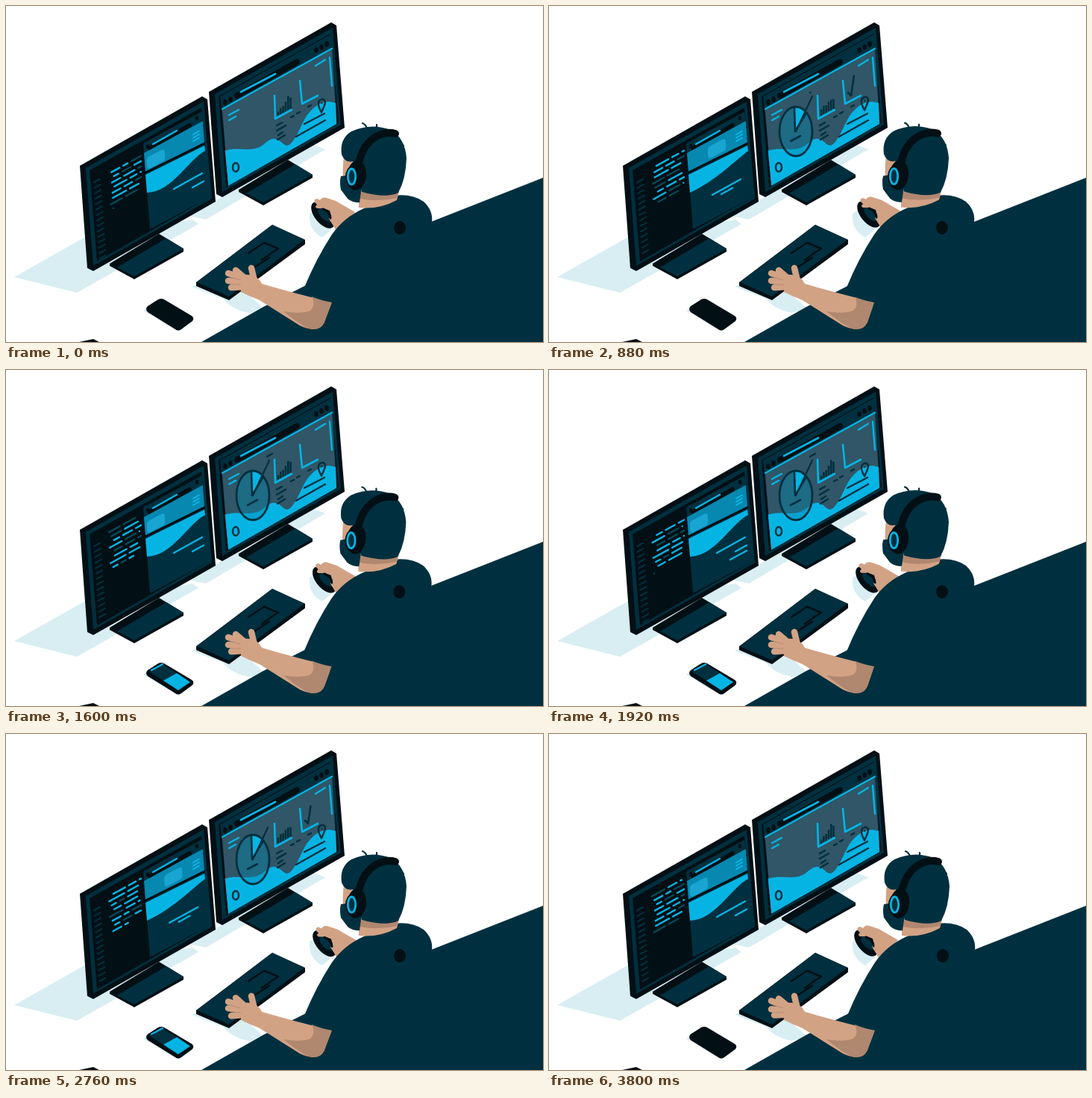
Write an HTML page with a canvas that moves like this. It is 720 px wide and 450 px high and loops after 3840 ms.

```html
<!DOCTYPE html>
<html lang="en">
<head>
<meta charset="utf-8">
<title>Developer at work</title>
<style>
html, body { margin: 0; width: 100%; height: 100%; overflow: hidden; background: #fff; }
canvas { display: block; width: 720px; height: 450px; }
</style>
</head>
<body>
<canvas id="stage" width="720" height="450"></canvas>
<script>
const ctx = document.getElementById('stage').getContext('2d');
const LOOP = 3840, HALF = LOOP / 2;
const TEAL = '#00303f', INK = '#020f14', CYAN = '#06b4e4', GREY = '#305667',
      BLUE = '#0688b1', PALE = '#d8eef3', SKIN = '#d2a284', SHADE = '#b0876f';

const clamp = x => Math.max(0, Math.min(1, x));
const mix = (a, b, k) => a + (b - a) * k;
const ramp = (t, from, to) => clamp((t - from) / (to - from));
const ease = (t, from, to) => { const k = ramp(t, from, to); return k * k * (3 - 2 * k); };
const random = n => { const s = Math.sin(n * 91.7 + 3.1) * 43758.5; return s - Math.floor(s); };

function keys(t, list) {
  for (let i = 1; i < list.length; i++) {
    const [t0, v0] = list[i - 1], [t1, v1] = list[i];
    if (t <= t1) return mix(v0, v1, ease(t, t0, t1));
  }
  return list[list.length - 1][1];
}

function fill(color, d) {
  ctx.fillStyle = color;
  ctx.fill(new Path2D(d));
}

function stroke(color, width, d) {
  ctx.strokeStyle = color;
  ctx.lineWidth = width;
  ctx.stroke(new Path2D(d));
}

function oval(x, y, rx, ry, color, width = 0, turn = 0) {
  ctx.beginPath();
  ctx.ellipse(x, y, rx, ry, turn, 0, Math.PI * 2);
  if (width) { ctx.strokeStyle = color; ctx.lineWidth = width; ctx.stroke(); }
  else { ctx.fillStyle = color; ctx.fill(); }
}

function group(dx, dy, draw) {
  ctx.save();
  ctx.translate(dx, dy);
  draw();
  ctx.restore();
}

function clipped(d, draw) {
  ctx.save();
  ctx.clip(new Path2D(d));
  draw();
  ctx.restore();
}

function desk() {
  fill('#fff', 'M0 0H720V450H0Z');
  fill(PALE, 'M11 363L105 310L250 286L258 292L95 384Z');
  fill(PALE, 'M245 281L268 286L428 192L412 186Z');
  fill(PALE, 'M249 376L262 370L300 391L318 380L347 406L325 411Q302 406 291 392Z');
  fill(PALE, 'M407 278Q405 300 424 310L437 299L420 270Z');
  fill(PALE, 'M184 408L191 403L234 434L228 434Z');
  fill(TEAL, 'M262 450L345 403L570 289L720 230V450Z');
  fill(INK, 'M98 450L117 446L125 450Z');
}

function stand(x, y) {
  group(x, y, () => {
    fill(INK, 'M0 0L66-40L99-20V-16L33 21L0 3Z');
    fill(TEAL, 'M10 5L76-34L99-20L33 17Z');
  });
}

function monitorBody(x, y) {
  group(x, y, () => {
    fill(INK, 'M0 0L164-93L171-89L182 48L18 141L10 137Z');
    fill(TEAL, 'M8 3L166-86L177 44L18 134Z');
    fill(INK, 'M13 6L163-78L174 42L23 128Z');
  });
}

function gutter(scroll) {
  clipped('M115 233L132 224L140 330L124 341Z', () => {
    for (let i = 0; i < 16; i++) {
      const y = 226 + (i - scroll) * 7.3, x = 118 + (y - 232) * .075;
      stroke(TEAL, 2.2, `M${x} ${y + 3}L${x + 8} ${y - 1.5}`);
    }
  });
}

function codeRow(row, y, typed) {
  const seed = row % 16;
  let x = 138 + Math.floor(random(seed) * 3) * 3 + (y - 220) * .055;
  let left = typed * 38;
  for (let i = 0; i < 3; i++) {
    const size = 5 + random(seed * 5 + i) * 16;
    const length = Math.min(size, left, 181 - x);
    if (length <= 0) return;
    const rise = v => y - (v - 138) * .55;
    const color = random(seed * 9 + i + 2) < .3 ? '#064757' : CYAN;
    stroke(color, 2.4, `M${x} ${rise(x)}L${x + length} ${rise(x + length)}`);
    x += size + 5;
    left -= size + 4;
  }
}

function code(t) {
  const head = t / 240, row = Math.floor(head), part = head - row;
  const shift = ease(part, 0, .3);
  gutter(shift);
  for (let i = 0; i < 8; i++) {
    codeRow(row - i + 32, 274 - (i + shift - 1) * 7.1 - 7, i ? 1 : part);
  }
}

function page(t) {
  const local = t % HALF;
  const k = ease(local, 480, 880) * (1 - ease(local, 1290, 1470));
  fill(TEAL, 'M184 184L263 141L277 254L193 299Z');
  stroke(INK, 6, 'M193 190L246 160');
  stroke(CYAN, 2.5, 'M197 185L229 167');
  oval(190, 188, 2.2, 3, INK);
  oval(256, 150, 2.2, 3, INK);
  fill(BLUE, 'M185 197L264 154L266 184L187 222Z');
  group(mix(201, 225, k), mix(205, 191, k), () => {
    ctx.transform(1, -.53, .06, 1, 0, 0);
    ctx.fillStyle = '#19a5d2';
    ctx.beginPath();
    ctx.roundRect(-12, -8, 24, 16, 4);
    ctx.fill();
  });
  for (let y = 172; y < 183; y += 4.5) stroke('#08b9e8', 1.8, `M251 ${y}L259 ${y - 4.5}`);
  const c1 = mix(249, 234, k), c2 = mix(205, 211, k);
  fill(CYAN, `M187 226L266 187L267 194C245 ${c2} 223 ${c1} 189 250Z`);
  stroke(INK, 3, 'M187 223L266 184');
  const bar = (x, y, length, dx, dy) => {
    x += dx * k; y += dy * k;
    stroke(CYAN, 2.3, `M${x} ${y}L${x + length} ${y - length * .55}`);
  };
  bar(225, 245, 38, -6, 8);
  bar(250, 243, 15, -19, 9);
  if (local < 300 && t >= HALF) bar(243, 254, 22, 0, 0);
}

function leftMonitor(t) {
  stand(139, 345);
  monitorBody(99, 214);
  clipped('M112 220L262 139L275 256L122 342Z', () => { code(t); page(t); });
}

function pie(t) {
  const size = ease(t, 280, 600) * (1 - ease(t, 3230, 3570));
  if (size <= 0) return;
  ctx.save();
  ctx.translate(331, 168);
  ctx.scale(size, size);
  oval(0, 0, 22, 33, 'rgba(6,137,177,.42)');
  fill(CYAN, 'M-1 0L-1-32Q9-32 14-25Z');
  oval(0, 0, 22, 33, TEAL, 2.8);
  stroke(TEAL, 2.6, 'M-2-31L-1 0L14-25');
  stroke(TEAL, 2.6, 'M-7 13L6 6');
  ctx.restore();
  const line = ease(t, 580, 860) * (1 - ease(t, 2680, 3120));
  if (line > 0) stroke(TEAL, 2.2, `M331 168L${331 + 22 * line} ${168 - 47 * line}`);
  const label = ramp(t, 870, 1120) * (1 - ramp(t, 2450, 2690));
  if (label > 0) stroke(TEAL, 2.4, `M350 116L${350 + 7 * label} ${116 - 4 * label}`);
}

function barChart(t) {
  const k = (1 - Math.cos(t / HALF * Math.PI * 2)) / 2;
  const low = [5, 8, 9, 13, 19, 15], high = [8, 11, 10, 13, 14, 13];
  low.forEach((h, i) => {
    const x = 365 + i * 3.3, y = 146.5 - i * 1.75;
    ctx.fillStyle = TEAL;
    ctx.fillRect(x - 1.2, y - mix(h, high[i], k), 2.5, mix(h, high[i], k));
  });
  stroke(CYAN, 2.6, 'M360 120L361 151L383 139');
}

function trendLine(t) {
  const local = t % HALF, length = 49;
  const end = ramp(local, 440, 1110) * length, start = ramp(local, 880, 1560) * length;
  if (end > start) {
    ctx.save();
    ctx.setLineDash([end - start, 200]);
    ctx.lineDashOffset = -start;
    stroke(TEAL, 2.6, 'M401 116L405 120L409 93L412 98L417 91');
    ctx.restore();
  }
  stroke(CYAN, 2.6, 'M394 100L397 131L418 120');
}

function dashboard(t) {
  fill(TEAL, 'M287 121L437 37L444 157L299 240Z');
  fill(GREY, 'M290 139L437 57L443 158L298 241Z');
  fill(CYAN, 'M293 194C310 188 323 195 337 190C347 187 352 176 361 178C371 180 373 191 381 185C393 174 397 150 411 138C421 129 430 126 442 130L443 158L298 241Z');
  stroke(CYAN, 2.2, 'M290 138L437 57');
  stroke(INK, 8, 'M310 120L390 75');
  stroke(CYAN, 2.8, 'M315 115L361 91');
  for (const [x, y] of [[294, 129], [301, 125], [416, 59], [423, 55], [430, 51]])
    oval(x, y, 2.8, 3.8, INK);
  stroke(CYAN, 2.4, 'M299 146L312 139M299 153L308 148M415 80L428 72M434 69L437 107');
  pie(t);
  barChart(t);
  trendLine(t);
  stroke(TEAL, 2.5, 'M363 160L370 156M363 167L375 160M365 173L371 169M364 179L374 173');
  stroke(TEAL, 2.5, 'M382 149L386 147M390 144L394 142M405 135L409 133');
  stroke(TEAL, 2.4, 'M400 158L427 144M389 175L428 153');
  oval(308, 216, 4, 5.8, TEAL, 2.6);
  const bob = 1.5 * Math.cos(t / HALF * Math.PI * 2);
  group(423, 131 + bob, () => {
    stroke(TEAL, 2.5, 'M0 10C-3 4-5 1-4-3C-3-8 4-10 5-4C5 0 2 5 0 10Z');
    oval(.4, -2.6, 1, 1.4, TEAL);
  });
}

function rightMonitor(t) {
  stand(312, 246);
  monitorBody(272, 115);
  clipped('M287 121L437 36L444 158L298 241Z', () => dashboard(t));
}

function keyboard() {
  fill(INK, 'M255 370L357 293L401 313V319L299 394L255 375Z');
  fill(TEAL, 'M256 370L357 293L400 313L299 389Z');
  stroke(INK, 2.5, 'M325 331L346 317L365 325L355 331M343 340L357 330M333 350L353 337');
}

function phone(t) {
  fill(INK, 'M190 402L204 393Q208 391 212 393L249 415Q253 418 250 422L235 433Q231 436 227 433L190 410Q186 406 190 402Z');
  if (t < 1480 || t > 3600) return;
  fill(TEAL, 'M192 404L210 394L229 406L211 416Z');
  fill(CYAN, 'M211 416L229 406L247 418L231 429Z');
  stroke(CYAN, 2.2, 'M195 402L210 394');
}

function mouseHand(t) {
  const dx = keys(t, [[0, 0], [480, 1], [880, 4], [1280, 1.5], [1920, 2], [2760, 2], [3400, 0]]);
  const dy = keys(t, [[0, 0], [880, -1], [1280, 1], [2760, .5], [3400, 0]]);
  group(dx, dy, () => {
    oval(425, 280, 21, 11, INK, 0, .88);
    oval(428, 280, 12, 6, TEAL, 0, .75);
    fill(SKIN, 'M414 263Q412 259 417 258L421 260Q424 255 430 257L442 261L468 276L443 302Q439 294 433 285Q436 280 434 274L426 271L417 271Q413 269 417 266Z');
    stroke(INK, 3, 'M425 272Q435 276 435 284');
  });
}

function typingHand(t) {
  const tap = Math.sin(t / 80 * Math.PI) * .6;
  const low = ease(t, 3250, 3380) * (1 - ease(t, 3440, 3600));
  fill(SKIN, 'M315 361Q330 357 340 367L343 372Q370 380 405 389L437 397Q428 421 422 430Q411 436 394 428L340 394Q327 389 315 383Z');
  fill(SHADE, 'M400 377L437 396L427 424Q422 434 410 433Q401 432 372 409Q395 413 408 408Q415 402 411 391Z');
  stroke(SKIN, 8.5, `M298 ${358 + tap}L316 364M${308 + low * 2} ${354 - tap + low * 2}L322 366`);
  stroke(SKIN, 8.5, `M298 ${368 - tap}L317 370M302 ${377 + tap}L320 376M329 351L334 372`);
  oval(324, 372, 12, 11, SKIN);
  stroke(SHADE, .8, 'M300 363L314 367M302 373L315 373');
}

function torso() {
  fill(TEAL, 'M400 377Q416 338 437 306Q453 283 480 271L520 254Q544 251 560 262Q573 274 571 290L640 450H420L437 397Q412 392 403 385Z');
  oval(528, 297, 8, 9, INK);
}

function head() {
  fill(SKIN, 'M473 247L527 249L524 260Q500 273 473 270Z');
  fill(SHADE, 'M474 250L527 247L524 257Q500 263 474 258Z');
  fill(SKIN, 'M453 200L469 205L467 234L452 230Q451 220 453 200Z');
  fill(TEAL, 'M449 228L456 227L477 242L474 263Q465 264 458 258L449 246Q447 236 449 228Z');
  fill(TEAL, 'M450 199Q447 178 463 168Q489 156 516 166Q535 177 537 204Q536 232 526 250Q510 258 477 249L465 208Q455 211 450 199Z');
  stroke(TEAL, 2.2, 'M478 157Q482 158 484 164M497 159Q498 162 494 165');
  stroke(INK, 10, 'M472 216Q476 189 493 177Q508 167 522 171');
  stroke(TEAL, 2.2, 'M526 187Q531 183 533 187');
  oval(470, 227, 13, 20, INK, 0, .12);
  oval(463.5, 229, 8.5, 14, INK);
  oval(463.5, 228.5, 5.2, 10.5, TEAL);
  oval(463.5, 228.5, 5.2, 10.5, CYAN, 2.8);
}

function draw(t) {
  ctx.lineCap = ctx.lineJoin = 'round';
  const sway = -keys(t, [[0, 0], [880, 1], [1280, .2], [1920, 1], [2760, 0]]);
  desk();
  rightMonitor(t);
  leftMonitor(t);
  keyboard();
  phone(t);
  mouseHand(t);
  typingHand(t);
  group(sway, 0, torso);
  group(sway, sway * .4, head);
}

function tick() {
  draw(performance.now() % LOOP);
  requestAnimationFrame(tick);
}
tick();
</script>
</body>
</html>
```
